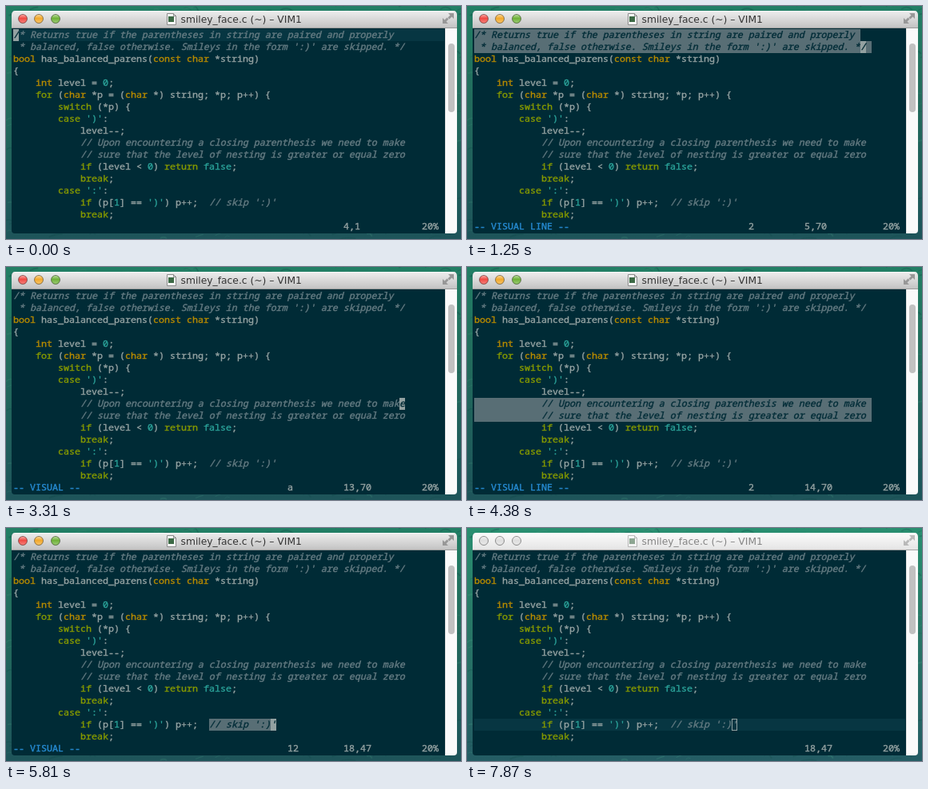
Recreate the animation shown at these times as an HTML page. Size 569x292 px, loop 7.98 s.

```html
<!DOCTYPE html>
<html lang="en">
<head>
<meta charset="utf-8">
<title>Comment text objects</title>
<style>
html, body { margin: 0; width: 100%; height: 100%; overflow: hidden; background: #1d5f57; }
svg { display: block; width: 569px; height: 292px; }
.mono text {
  font: 500 11.667px "Noto Sans Mono", "DejaVu Sans Mono", monospace;
  white-space: pre; stroke-width: 0.4px;
}
.mono .comment { font-style: italic; }
.title { font: 12.3px "DejaVu Sans", "Open Sans", sans-serif; }
</style>
</head>
<body>
<svg id="stage" viewBox="0 0 569 292" xmlns="http://www.w3.org/2000/svg">
  <defs>
    <linearGradient id="sea" x1="0" y1="0" x2="0" y2="1">
      <stop offset="0" stop-color="#2b9474"/>
      <stop offset="0.4" stop-color="#2a7c69"/>
      <stop offset="1" stop-color="#255f67"/>
    </linearGradient>
    <linearGradient id="bar" x1="0" y1="0" x2="0" y2="1">
      <stop offset="0" stop-color="#eeeeee"/>
      <stop offset="1" stop-color="#c1c1c1"/>
    </linearGradient>
    <linearGradient id="barPale" x1="0" y1="0" x2="0" y2="1">
      <stop offset="0" stop-color="#fbfbfb"/>
      <stop offset="1" stop-color="#e4e4e4"/>
    </linearGradient>
    <linearGradient id="gloss" x1="0" y1="0" x2="0" y2="1">
      <stop offset="0" stop-color="#fff" stop-opacity="0.5"/>
      <stop offset="0.45" stop-color="#fff" stop-opacity="0"/>
      <stop offset="1" stop-color="#fff" stop-opacity="0.3"/>
    </linearGradient>
    <clipPath id="frame"><path d="M7 281V11q0-5 5-5H559q5 0 5 5V281q0 4-4 4H11q-4 0-4-4z"/></clipPath>
    <clipPath id="selClip"></clipPath>
  </defs>
  <rect width="569" height="292" fill="url(#sea)"/>
  <g id="waves" fill="none"></g>
  <rect id="shade" width="569" height="292" fill="#032a2c"/>
  <g clip-path="url(#frame)">
    <rect x="7" y="6" width="557" height="279" fill="#002b36"/>
    <rect id="titlebar" x="7" y="6" width="557" height="22"/>
    <rect x="7" y="6" width="557" height="1" fill="#fff" opacity="0.6"/>
    <rect x="7" y="27" width="557" height="1" fill="#8b8b8b" opacity="0.7"/>
    <g id="lights"></g>
    <g id="icon">
      <path d="M201.500 9.500h8l3 3v11h-11z" fill="#fafafa" stroke="#8a8a8a"/>
      <path d="M209.500 9.500v3h3" fill="none" stroke="#8a8a8a"/>
      <rect x="203" y="13" width="7" height="7" fill="#3c6a45"/>
    </g>
    <text id="titleText" class="title" x="218.500" y="21">smiley_face.c (~) – VIM1</text>
    <path id="expand" d="M553 9h7v7l-2.500-2.500-3 3-2-2 3-3zM553 22h-7v-7l2.500 2.500 3-3 2 2-3 3z" fill="#979797"/>
    <rect x="549" y="28" width="15" height="257" fill="#fafafa"/>
    <rect x="549" y="28" width="1" height="257" fill="#e4e4e4"/>
    <rect x="553" y="47" width="8" height="86" rx="4" fill="#c1c1c1"/>
    <g class="mono">
      <rect id="cursorLine" x="9" width="539" height="15" fill="#073642"/>
      <g id="selection" fill="#586e75"></g>
      <g id="code"></g>
      <g id="codeDark" clip-path="url(#selClip)"></g>
      <rect id="cursor"/>
      <text id="under" fill="#002b36" stroke="#002b36"></text>
      <text id="mode" fill="#268bd2" stroke="#268bd2"></text>
      <g fill="#93a1a1" stroke="#93a1a1">
        <text id="pending"></text>
        <text id="ruler"></text>
        <text id="percent">20%</text>
      </g>
    </g>
  </g>
</svg>
<script>
const LOOP = 7980, CELL_W = 7, CELL_H = 15, LEFT = 9, TOP = 29, FIRST_LINE = 4;
const LINES = [
  "/* Returns true if the parentheses in string are paired and properly",
  " * balanced, false otherwise. Smileys in the form ':)' are skipped. */",
  "bool has_balanced_parens(const char *string)",
  "{",
  "    int level = 0;",
  "    for (char *p = (char *) string; *p; p++) {",
  "        switch (*p) {",
  "        case ')':",
  "            level--;",
  "            // Upon encountering a closing parenthesis we need to make",
  "            // sure that the level of nesting is greater or equal zero",
  "            if (level < 0) return false;",
  "            break;",
  "        case ':':",
  "            if (p[1] == ')') p++;  // skip ':)'",
  "            break;"
];
const COLORS = {
  comment: "#647b82", type: "#b58900", keyword: "#859900",
  constant: "#2aa198", plain: "#93a1a1"
};
const TOKEN = new RegExp([
  "(?<comment>\\/[/*].*|^ \\* .*)",
  "(?<type>\\b(?:bool|const|char|int)\\b)",
  "(?<keyword>\\b(?:for|switch|case|if|return|break)\\b)",
  "(?<constant>'.'|\\b\\d+\\b|\\bfalse\\b)",
  "(?<plain>\\w+|[^\\w\\s'])"
].join("|"), "g");

// Each step changes only the fields it names.
const STEPS = [
  [0, { mode: "", row: 0, col: 0, keys: "", cursor: "block", sel: null, active: true }],
  [270, { cursor: "off" }],
  [440, { cursor: "block" }],
  [890, { mode: "VISUAL", keys: "1" }],
  [980, { keys: "a" }],
  [1250, { mode: "VISUAL LINE", keys: "2", row: 1, col: 69, sel: [0, 1, 0] }],
  [1970, { cursor: "off" }],
  [2150, { mode: "", keys: "", cursor: "block", sel: null }],
  [2590, { keys: "8" }],
  [2770, { keys: "", row: 9 }],
  [3220, { mode: "VISUAL", keys: "1" }],
  [3310, { keys: "a" }],
  [3660, { mode: "VISUAL LINE", keys: "2", row: 10, sel: [9, 10, 0] }],
  [4380, { cursor: "off" }],
  [4550, { mode: "", keys: "", cursor: "block", sel: null }],
  [4820, { keys: "4" }],
  [5090, { keys: "", row: 14, col: 12 }],
  [5450, { mode: "VISUAL", keys: "1" }],
  [5540, { keys: "a" }],
  [5810, { keys: "12", col: 46, sel: [14, 14, 35] }],
  [6530, { cursor: "off" }],
  [6620, { mode: "", keys: "", cursor: "block", sel: null }],
  [7870, { cursor: "hollow", active: false }]
];

const $ = id => document.getElementById(id);
const cellX = col => LEFT + col * CELL_W;
const cellY = row => TOP + row * CELL_H;

function set(el, attrs) {
  for (const key in attrs) el.setAttribute(key, attrs[key]);
  return el;
}

function add(parent, tag, attrs) {
  const el = document.createElementNS("http://www.w3.org/2000/svg", tag);
  return parent.appendChild(set(el, attrs));
}

function place(el, row, col, text) {
  set(el, { x: cellX(col), y: cellY(row) + 11 });
  if (text !== undefined) el.textContent = text;
}

function drawCode() {
  LINES.forEach((line, row) => {
    for (const match of line.matchAll(TOKEN)) {
      const kind = Object.keys(match.groups).find(k => match.groups[k] !== undefined);
      const lead = match[0].search(/\S/);
      for (const [layer, fill] of [["code", COLORS[kind]], ["codeDark", "#002b36"]]) {
        const run = add($(layer), "text", { fill, stroke: fill, class: kind });
        place(run, row, match.index + lead, match[0].trim());
      }
    }
  });
}

function drawWaves() {
  let seed = 7;
  const rand = () => (seed = seed * 16807 % 2147483647) / 2147483647;
  for (let i = 0; i < 500; i++) {
    const x = rand() * 569, y = rand() * 292, len = 5 + rand() * 15;
    add($("waves"), "path", {
      d: `M${x} ${y}q${len / 2} ${-2 - rand() * 4} ${len} ${rand() * 8 - 4}`,
      stroke: rand() < 0.5 ? "#4a9a84" : "#15514c",
      "stroke-width": 0.7 + rand() * 1.5, opacity: 0.3
    });
  }
}

const lights = [[21, "#f04a43"], [41, "#f2a92b"], [62, "#6fb238"]].map(([cx, fill]) => {
  const dot = add($("lights"), "circle", { cx, cy: 16, r: 5.5, stroke: "#000", "stroke-opacity": 0.4 });
  add($("lights"), "circle", { cx, cy: 16, r: 5, fill: "url(#gloss)" });
  return { dot, fill };
});

function drawSelection(sel, mode) {
  const layers = [$("selection"), $("selClip")];
  layers.forEach(el => el.replaceChildren());
  if (!sel) return;
  const [from, to, col] = sel;
  for (let row = from; row <= to; row++) {
    const end = LINES[row].length + (mode === "VISUAL LINE" ? 1 : 0);
    const box = { x: cellX(col), y: cellY(row), width: (end - col) * CELL_W, height: CELL_H };
    layers.forEach(el => add(el, "rect", box));
  }
}

function drawCursor({ row, col, cursor }) {
  const hollow = cursor === "hollow", inset = hollow ? 0.5 : 0;
  set($("cursor"), {
    x: cellX(col) + inset, y: cellY(row) + inset,
    width: CELL_W - 2 * inset, height: CELL_H - 2 * inset,
    fill: hollow ? "none" : "#93a1a1",
    stroke: hollow ? "#93a1a1" : "none",
    visibility: cursor === "off" ? "hidden" : "visible"
  });
  place($("under"), row, col, cursor === "block" ? LINES[row][col] : "");
  const inComment = row !== 14 || col >= 35;
  $("under").setAttribute("class", inComment ? "comment" : "");
}

function drawWindow(active) {
  set($("shade"), { opacity: active ? 0.2 : 0.04 });
  set($("titlebar"), { fill: active ? "url(#bar)" : "url(#barPale)" });
  set($("titleText"), { fill: active ? "#333" : "#858585" });
  set($("icon"), { opacity: active ? 1 : 0.55 });
  set($("expand"), { opacity: active ? 1 : 0.6 });
  for (const { dot, fill } of lights) set(dot, { fill: active ? fill : "#dedede" });
}

function draw(s) {
  drawWindow(s.active);
  set($("cursorLine"), { y: cellY(s.row), visibility: s.mode ? "hidden" : "visible" });
  drawSelection(s.sel, s.mode);
  drawCursor(s);
  place($("mode"), 16, 0, s.mode && `-- ${s.mode} --`);
  place($("pending"), 16, 49, s.keys);
  place($("ruler"), 16, 59, `${s.row + FIRST_LINE},${s.col + 1}`);
}

let shown = -1;
function render(time) {
  const t = time % LOOP;
  const index = STEPS.findLastIndex(([at]) => at <= t);
  if (index === shown) return;
  shown = index;
  draw(Object.assign({}, ...STEPS.slice(0, index + 1).map(step => step[1])));
}

drawWaves();
drawCode();
place($("percent"), 16, 73);
const start = performance.now();
function tick() {
  render(performance.now() - start);
  requestAnimationFrame(tick);
}
tick();
</script>
</body>
</html>
```
